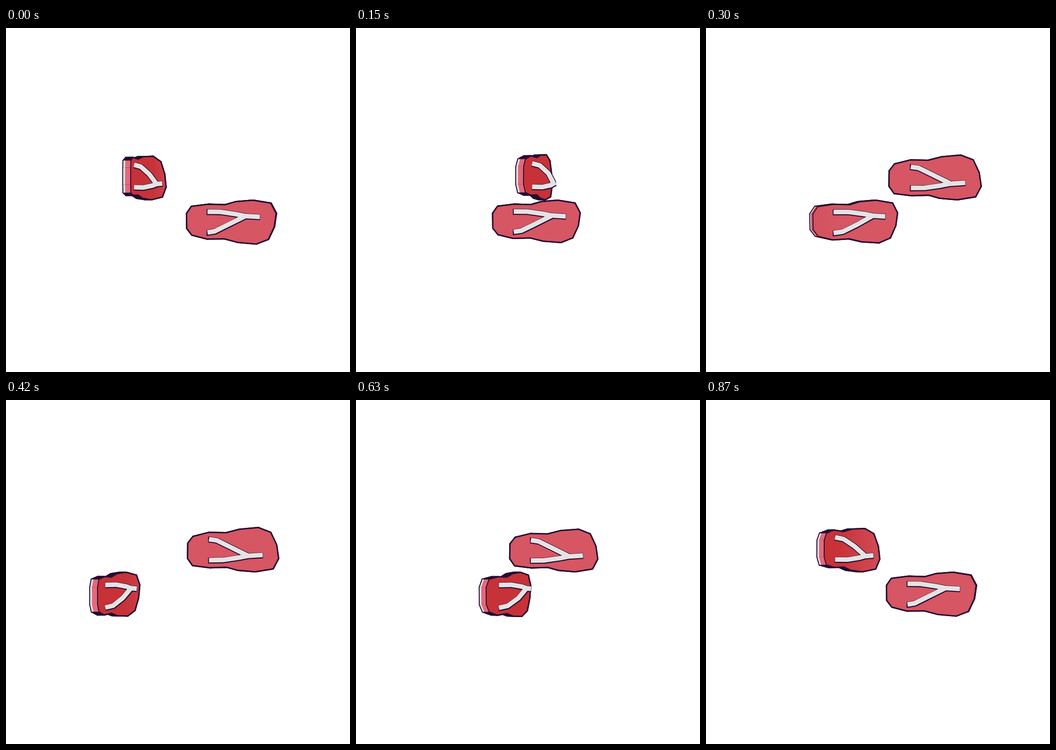
An HTML page with a canvas that plays this animation: 748 by 748 pixels, repeating every 900 ms.

```html
<!DOCTYPE html>
<html lang="en">
<head>
<meta charset="utf-8">
<title>Walking flip-flops</title>
<style>
html, body { margin: 0; width: 100%; height: 100%; overflow: hidden; background: #fff; }
canvas { display: block; width: 748px; height: 748px; }
</style>
</head>
<body>
<canvas id="stage" width="748" height="748"></canvas>
<script>
const ctx = document.getElementById('stage').getContext('2d');
const LOOP = 900, STEP = 30;
const MID = 374, CAMERA = 1300;      // view from above the stage centre
const LENGTH = 193, THICK = 14;
const INK = '#260c33', PINK = [214, 86, 99], RED = [199, 49, 55];

// Sole outline: distance from the heel, distance from the centre line.
const SOLE = [[1.5, 29], [12, 14], [48, 9.5], [84, 10.5], [107, 4], [143, 1], [180, 7], [191, 28],
  [187, 56], [175, 82], [150, 92], [111, 89], [83, 82], [46, 83], [13, 75], [2, 61]];
// Straps: the same, plus height above the sole.
const STRAPS = [
  [[47, 69, 2], [64, 66, 12], [92, 52, 21], [128, 34, 21]],
  [[47, 25, 2], [77, 25, 13], [110, 29.5, 21], [128, 33, 21], [159, 35, 17]]
];

// Poses: time, toe x, toe height, heel pitch, toe pitch (degrees).
const UPPER = [
  [0, 349, 0, 95, 45], [150, 425, 33, 72, 72], [210, 500, 100, 40, 40],
  [300, 587, 75, -8, -8], [345, 596, 92, -10, -10], [510, 563, 25, -7, -7],
  [630, 526, 10, -3, -3], [750, 482, 3, 0, 0], [870, 379, 0, 74, 36]
];
const LOWER = [
  [0, 580, 55, -12, -12], [150, 489, 0, 0, 0], [300, 418, 0, 30, 12],
  [405, 310, 5, 80, 45], [510, 203, 25, 101.5, 101.5], [630, 380, 15, 64, 64],
  [750, 585, 125, -12, -12], [780, 601, 128, -14, -14], [870, 580, 55, -12, -12]
];

// Periodic cubic interpolation of a pose table.
function poseAt(keys, t) {
  const n = keys.length;
  const key = i => {
    const wrap = Math.floor(i / n), k = keys[i - wrap * n];
    return [k[0] + wrap * LOOP, ...k.slice(1)];
  };
  let i = n - 1;
  while (keys[i][0] > t) i--;
  const [p, a, b, q] = [key(i - 1), key(i), key(i + 1), key(i + 2)];
  const d = b[0] - a[0], f = (t - a[0]) / d, g = 1 - f;
  return [1, 2, 3, 4].map(c => {
    const ma = (b[c] - p[c]) / (b[0] - p[0]) * d;
    const mb = (q[c] - a[c]) / (q[0] - a[0]) * d;
    return a[c] * (1 + 2 * f) * g * g + ma * f * g * g + b[c] * f * f * (3 - 2 * f) - mb * f * f * g;
  });
}

function trace(points, close = true) {
  ctx.beginPath();
  points.forEach(p => ctx.lineTo(p[0], p[1]));
  if (close) ctx.closePath();
}

function fill(points, color) {
  trace(points);
  ctx.fillStyle = color;
  ctx.fill();
}

function stroke(points, color, width, close) {
  trace(points, close);
  ctx.strokeStyle = color;
  ctx.lineWidth = width;
  ctx.stroke();
}

const area = pts => pts.reduce((sum, p, i) => {
  const q = pts[(i + 1) % pts.length];
  return sum + p[0] * q[1] - q[0] * p[1];
}, 0);

const mix = (p, q, f) => p.map((v, i) => v + (q[i] - v) * f);

function shade(angle) {
  const f = Math.min(1, Math.max(0, (angle * 180 / Math.PI - 25) / 40));
  return `rgb(${mix(PINK, RED, f).map(Math.round)})`;
}

function drawShoe(keys, t, side) {
  const [toeX, toeZ, heelPitch, toePitch] = poseAt(keys, t);
  const pitch = u => (heelPitch + (toePitch - heelPitch) * u / LENGTH) * Math.PI / 180;

  // Walk back from the toe along the bent sole, then project.
  function project(u, q, h = 0) {
    let x = toeX, z = toeZ;
    const n = 10, du = (LENGTH - u) / n;
    for (let i = 0; i < n; i++) {
      const a = pitch(u + (i + 0.5) * du);
      x -= Math.cos(a) * du;
      z += Math.sin(a) * du;
    }
    x += h * Math.sin(pitch(u));
    z += h * Math.cos(pitch(u));
    const s = CAMERA / (CAMERA - z);
    return [MID + (x - MID) * s, MID + side * q * s, z];
  }

  const top = SOLE.map(([u, q]) => project(u, q));
  const bottom = SOLE.map(([u, q]) => project(u, q, -THICK));
  const topSeen = area(top) * side > 0;
  const bottomSeen = area(bottom) * side < 0;

  const walls = SOLE.map(([u, q], i) => {
    const j = (i + 1) % SOLE.length, [u2, q2] = SOLE[j];
    const quad = [top[i], top[j], bottom[j], bottom[i]];
    const up = -(q2 - q) / Math.hypot(u2 - u, q2 - q) * Math.sin(pitch((u + u2) / 2));
    return { quad, up, seen: area(quad) * side < 0, z: top[i][2] + top[j][2] };
  });

  function drawStraps() {
    ctx.lineCap = 'butt';
    const arms = STRAPS.map(arm => arm.map(p => project(...p)));
    arms.forEach((arm, i) => {
      const [u, q, h] = STRAPS[i][0];
      const edge = [project(u - 2.5, q, h), ...arm].map(p => [p[0] + 0.6, p[1] + 0.8]);
      stroke(edge, INK, 13, false);
    });
    arms.forEach(arm => stroke(arm, '#e5e3e3', 10, false));
  }

  ctx.lineJoin = 'round';
  for (const face of [top, bottom, ...walls.map(w => w.quad)]) {
    fill(face, INK);
    stroke(face, INK, 4);
  }
  if (!topSeen) drawStraps();

  walls.filter(w => w.seen).sort((a, b) => a.z - b.z).forEach(({ quad, up }) => {
    if (up < 0.35) return fill(quad, INK);
    const [a, b, c, d] = quad;
    fill(quad, up > 0.6 ? '#e4687a' : '#d65a69');
    fill([mix(a, d, 0.76), mix(b, c, 0.76), c, d], '#e4e3e8');
  });

  if (bottomSeen) {
    fill(bottom, '#d4505c');
    stroke(bottom, INK, 2);
    fill(SOLE.map(([u, q]) => project(u, Math.max(q, 10), -THICK)), '#d5d6de');
  }

  if (topSeen) {
    const heel = project(0, 45)[0], toe = project(LENGTH, 45)[0];
    const paint = ctx.createLinearGradient(heel, 0, toe, 0);
    for (const f of [0, 0.3, 0.65, 1]) paint.addColorStop(f, shade(pitch(f * LENGTH)));
    fill(top, paint);
    stroke(top, INK, 2);
    drawStraps();
  }
}

function frame(now) {
  const t = Math.floor(now % LOOP / STEP) * STEP;
  ctx.fillStyle = '#fff';
  ctx.fillRect(0, 0, 748, 748);
  drawShoe(LOWER, t, 1);
  drawShoe(UPPER, t, -1);
}

const start = performance.now();
function tick() {
  frame(performance.now() - start);
  requestAnimationFrame(tick);
}
tick();
</script>
</body>
</html>
```
